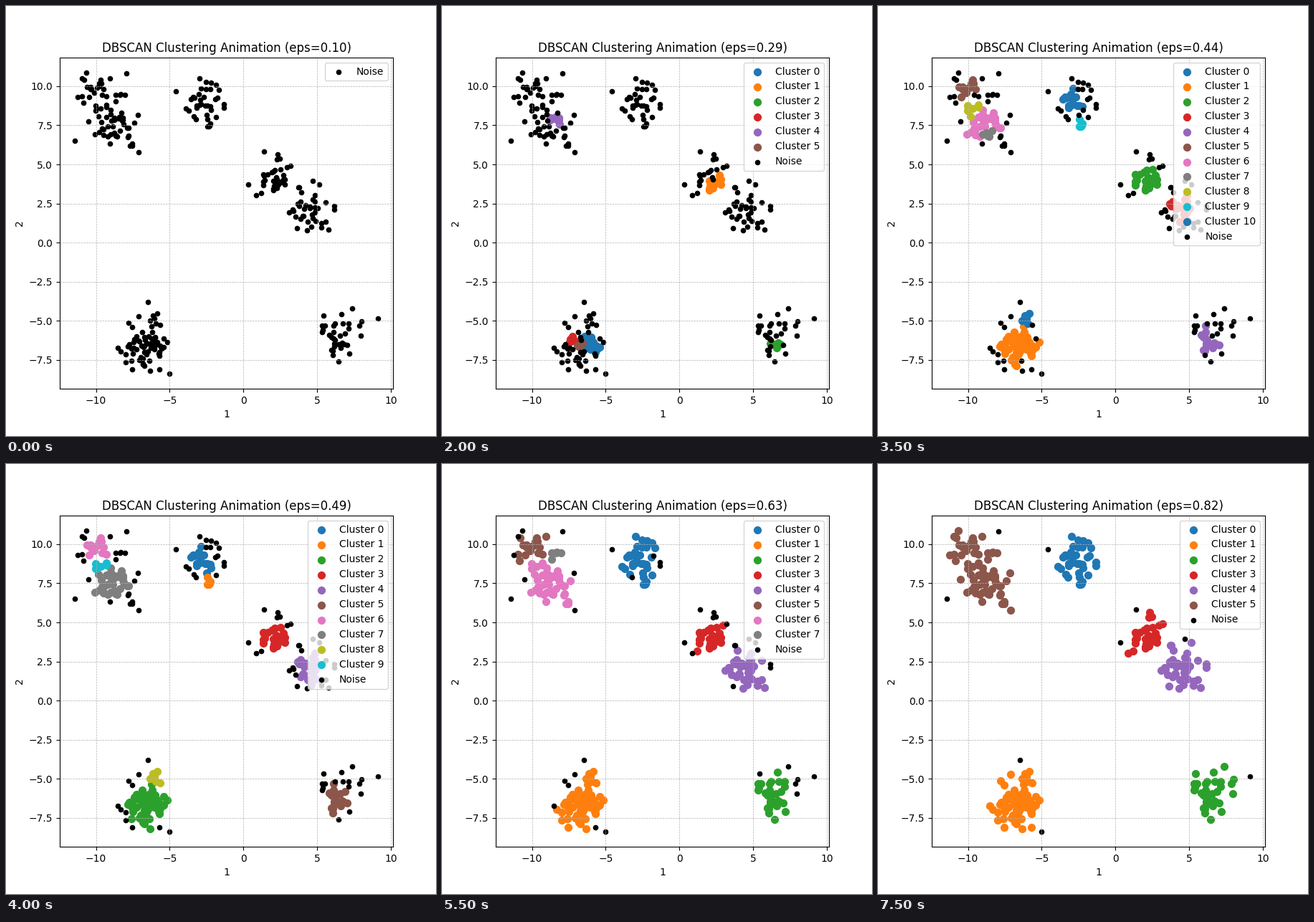
These frames come from a looping animation (600x600 px, 8 s). A matplotlib script:

```python
import numpy as np
import matplotlib.pyplot as plt
from matplotlib.animation import FuncAnimation

FRAMES = 16
INTERVAL = 500
MIN_SAMPLES = 5
EPS = np.linspace(0.1, 1.5, 30)[:FRAMES]


def make_blobs(n=300, k=8, std=0.8, seed=42):
    """Gaussian blobs around uniformly drawn centers, shuffled."""
    rng = np.random.RandomState(seed)
    centers = rng.uniform(-10, 10, size=(k, 2))
    sizes = [n // k + (i < n % k) for i in range(k)]
    pts = np.concatenate([rng.normal(loc=c, scale=std, size=(m, 2))
                          for c, m in zip(centers, sizes)])
    order = np.arange(n)
    rng.shuffle(order)
    return pts[order]


def dbscan(dist, eps):
    """Label each point with its cluster number, or -1 for noise."""
    near = dist <= eps
    core = near.sum(axis=1) >= MIN_SAMPLES
    labels = np.full(len(dist), -1)
    cluster = 0
    for start in range(len(dist)):
        if labels[start] != -1 or not core[start]:
            continue
        labels[start] = cluster
        stack = [start]
        while stack:
            i = stack.pop()
            if core[i]:
                fresh = np.flatnonzero(near[i] & (labels == -1))
                labels[fresh] = cluster
                stack.extend(fresh)
        cluster += 1
    return labels


points = make_blobs()
dist = np.linalg.norm(points[:, None] - points[None], axis=2)
runs = [dbscan(dist, eps) for eps in EPS]

fig, ax = plt.subplots(figsize=(6, 6), dpi=100)


def update(frame):
    ax.clear()
    labels = runs[frame]
    for c in range(labels.max() + 1):
        ax.scatter(*points[labels == c].T, s=50, color=f"C{c % 10}",
                   label=f"Cluster {c}")
    ax.scatter(*points[labels == -1].T, s=20, color="black", label="Noise")
    ax.set_title(f"DBSCAN Clustering Animation (eps={EPS[frame]:.2f})")
    ax.set_xlabel("1")
    ax.set_ylabel("2")
    ax.grid(True, linestyle="--", linewidth=0.5)
    ax.legend(loc="upper right")


anim = FuncAnimation(fig, update, frames=FRAMES, interval=INTERVAL, repeat=True)
plt.show()
```
